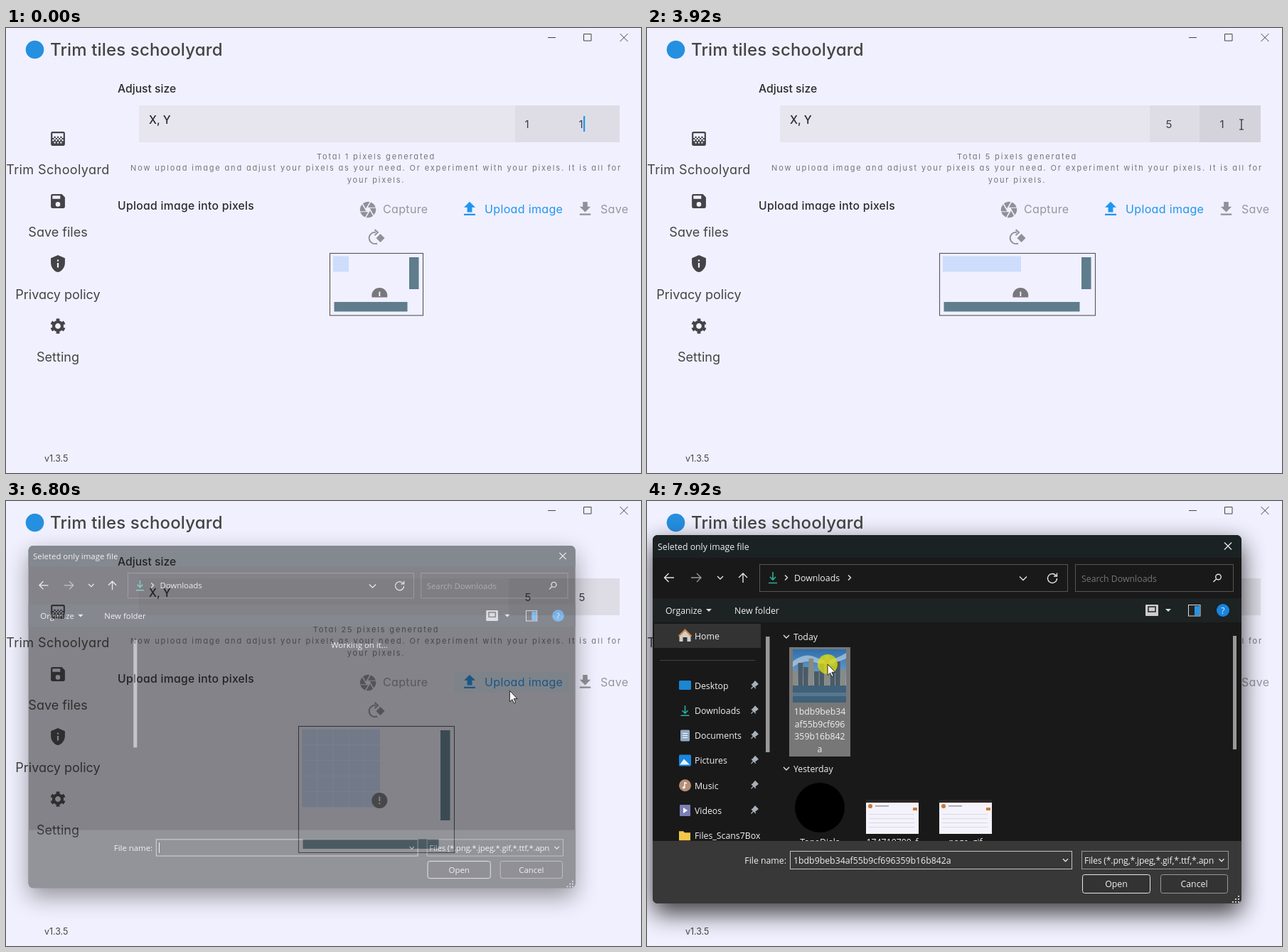
Write an HTML page that moves like this. It is 893 px wide and 627 px high and loops after 8 s.

```html
<!DOCTYPE html>
<html lang="en">
<head>
<meta charset="utf-8">
<title>Pixel grid app</title>
<style>
html, body { margin: 0; width: 100%; height: 100%; overflow: hidden; background: #f1f0fe; }
svg { display: block; width: 893px; height: 627px; }
text { white-space: pre; }
#app text { font-family: Inter, sans-serif; font-feature-settings: "cv11"; fill: #444; }
#app .head { font-size: 15.7px; font-weight: 500; fill: #2a2a2d; }
#app .nav { font-size: 18px; text-anchor: middle; }
#app .hint { font-size: 11px; letter-spacing: 1.84px; text-anchor: middle; fill: #75757c; }
#app .btn { font-size: 16px; letter-spacing: .35px; fill: #96969e; }
#app .num { font-size: 15px; fill: #3c3c40; }
#dialog text { font: 12.3px "Open Sans", "Noto Sans", sans-serif; fill: #f0f0f0; }
.line { fill: none; stroke: #e4e4e4; stroke-width: 1.4; }
.mid { text-anchor: middle; }
#shade { filter: blur(17px); }
</style>
</head>
<body>
<svg viewBox="0 0 893 627">
  <defs>
    <clipPath id="boxClip"><rect id="boxClipRect" x="411" y="317" width="220"/></clipPath>
    <clipPath id="listClip"><rect x="8" y="171" width="828" height="308"/></clipPath>
    <clipPath id="typeClip"><rect x="612" y="493" width="185" height="26"/></clipPath>
    <linearGradient id="sky" x2="0" y2="1">
      <stop stop-color="#2d6fae"/><stop offset="1" stop-color="#b9cfdd"/>
    </linearGradient>
  </defs>
  <g id="app"></g>
  <g id="dialog"></g>
  <g id="pointer">
    <circle id="click" r="14" fill="#dcdc10" opacity=".78"/>
    <path id="arrow" d="M0 0V15.5L3.6 12.2 6 17.6 8.3 16.6 5.9 11.3H10.8Z" fill="#fff" stroke="#222"/>
    <path id="beam" d="M-3-7H-1Q0-7 0-6 0-7 1-7H3M0-6V6M-3 7H-1Q0 7 0 6 0 7 1 7H3" fill="none" stroke="#222" stroke-width="1.2"/>
    <path id="hand" d="M0 2A1.8 1.8 0 0 1 3.6 2V8L8.2 9.2A2.5 2.5 0 0 1 10 12L9 17.5 8 21H.5L-4.5 14A1.5 1.5 0 0 1-2.5 11.8L0 13.6Z" fill="#fff" stroke="#222" stroke-width="1.2"/>
  </g>
</svg>
<script>
const $ = id => document.getElementById(id);
const rect = (x, y, w, h, fill, more = '') =>
  `<rect x="${x}" y="${y}" width="${w}" height="${h}" fill="${fill}" ${more}/>`;
const text = (x, y, s, more = '') => `<text x="${x}" y="${y}" ${more}>${s}</text>`;
const path = (d, more = 'class="line"') => `<path d="${d}" ${more}/>`;
const icon = (x, y, k, d, fill) =>
  `<path transform="translate(${x} ${y}) scale(${k}) translate(-12 -12)" d="${d}" fill="${fill}"/>`;
const range = n => [...Array(n).keys()];
const chevDown = (x, y, k = 4) => path(`M${x - k} ${y - k / 2}l${k} ${k}l${k} ${-k}`);
const chevRight = (x, y) => path(`M${x - 2} ${y - 3.5}l3.5 3.5l-3.5 3.5`);
const triangle = (x, y) => path(`M${x - 4} ${y - 2}h8l-4 4z`, 'fill="#ddd"');

function gear(x, y) {
  return `<g transform="translate(${x} ${y})" fill="none" stroke="#444448">
    <circle r="6" stroke-width="4.2"/>
    <circle r="9" stroke-width="3.4" pathLength="12" stroke-dasharray="1 1" stroke-dashoffset="1.5"/></g>`;
}

function drawApp() {
  const dark = '#444448', gray = '#909098', blue = '#1e96f0';
  const navs = ['Trim Schoolyard', 'Save files', 'Privacy policy', 'Setting'];
  $('app').innerHTML =
    rect(0, 0, 893, 627, '#f1f0fe') +
    '<circle cx="40.5" cy="30.5" r="12.8" fill="#2590e0"/>' +
    text(62, 39, 'Trim tiles schoolyard', 'font-size="24" font-weight="500" letter-spacing=".15"') +
    path('M762 13.5H773M812.5 8.5H823V18H812.5ZM863.5 8L874.5 19M874.5 8L863.5 19',
      'fill="none" stroke="#444"') +
    icon(73, 156, 1.1, 'M11 9h2v2h-2zm-2 2h2v2H9zm4 0h2v2h-2zm2-2h2v2h-2zM7 9h2v2H7zm12-6H5c-1.1 0-2 .9-2 2v14c0 1.1.9 2 2 2h14c1.1 0 2-.9 2-2V5c0-1.1-.9-2-2-2zM9 18H7v-2h2zm4 0h-2v-2h2zm4 0h-2v-2h2zm2-7h-2v2h2v2h-2v-2h-2v2h-2v-2h-2v2H9v-2H7v2H5v-2h2v-2H5V5h14z', dark) +
    icon(73, 244, 1.1, 'M17 3H5c-1.1 0-2 .9-2 2v14c0 1.1.9 2 2 2h14c1.1 0 2-.9 2-2V7l-4-4zm-5 16a3 3 0 1 1 0-6 3 3 0 0 1 0 6zm3-10H5V5h10v4z', dark) +
    icon(73, 332, 1.1, 'M12 1L3 5v6c0 5.55 3.84 10.74 9 12 5.16-1.26 9-6.45 9-12V5zm-1 6h2v2h-2zm0 4h2v6h-2z', dark) +
    gear(73, 420) +
    navs.map((s, i) => text(73, 206 + i * 88, s, 'class="nav"' + (i ? '' : ' letter-spacing=".4"'))).join('') +
    text(54, 611, 'v1.3.5', 'font-size="12.4" fill="#555"') +
    text(157, 91, 'Adjust size', 'class="head"') +
    rect(187, 109, 676, 52, '#e7e6ef') +
    '<rect id="cells" y="109" height="52" fill="#dedde6"/>' +
    rect(777, 109, 86, 52, '#d4d3dc', 'id="cellY"') +
    text(201, 135, 'X, Y', 'class="head"') +
    text(729.5, 141, '', 'class="num" id="numX"') + text(805.5, 141, '', 'class="num" id="numY"') +
    rect(0, 124, 2.2, 22, blue, 'id="caret"') +
    text(520.5, 185, '', 'class="hint" id="total"') +
    text(520.5, 201, 'Now upload image and adjust your pixels as your need. Or experiment with your pixels. It is all for', 'class="hint"') +
    text(520.5, 217.5, 'your pixels.', 'class="hint"') +
    text(157, 255.5, 'Upload image into pixels', 'class="head" letter-spacing=".3"') +
    icon(509, 256, 1.12, 'M9.4 10.5l4.77-8.26A10 10 0 0 0 5.68 4.25l3.66 6.35zM21.54 9a10 10 0 0 0-6-6.34L11.88 9zm.26 1h-7.49l5.05 8.75A10 10 0 0 0 21.8 10zM8.54 12l-3.9-6.75A10 10 0 0 0 2.2 14h7.49zm-6.08 3a10 10 0 0 0 6 6.34L12.12 15zm11.27 0l-3.9 6.76a10 10 0 0 0 8.49-2.01l-3.66-6.35z', gray) +
    text(530, 261, 'Capture', 'class="btn"') +
    rect(630, 240, 163, 30, '#e5effd', 'id="hover" rx="4"') +
    icon(652, 255, 1.14, 'M5 20h14v-2H5zm0-10h4v6h6v-6h4l-7-7z', blue) +
    text(673, 261, 'Upload image', `class="btn" style="fill:${blue}"`) +
    icon(814.5, 255, 1.1, 'M19 9h-4V3H9v6H5l7 7zM5 18v2h14v-2z', gray) +
    text(836, 261, 'Save', 'class="btn"') +
    path('M522 303.5A8.2 8.2 0 1 1 520 287.8M518.5 284l4.5 4-4.5 4', `fill="none" stroke="${gray}" stroke-width="1.9"`) +
    path('M526.5 290l6 6-6 6-6-6z', `fill="${gray}"`) +
    '<g id="grid"></g>';
}

function drawGrid(cols, rows) {
  const wide = cols > 1, tall = rows > 1;
  const x = wide ? 411.5 : 455.5, w = wide ? 219 : 131, h = tall ? 178 : 87.5;
  const cx = x + 4.5, cy = tall ? 422 : 377, bar = '#5f7d8c';
  let lines = '';
  if (tall) for (let i = 1; i < 5; i++)
    lines += `M${cx} ${321.5 + i * 22}h110M${cx + i * 22} 321.5v110`;
  $('boxClipRect').setAttribute('height', h - 25);
  $('grid').innerHTML =
    rect(x, 317.5, w, h, 'none', 'stroke="#55555a" stroke-width="1.1"') +
    rect(cx, 321.5, cols * 22, rows * 22, '#cdddfb') +
    path(lines, 'stroke="#dce7fd"') +
    rect(x + w - 19.5, 323, 13.5, tall ? 127 : 45, bar) +
    rect(x + 6, 298.5 + h, w - 28, 13.5, bar) +
    `<g clip-path="url(#boxClip)"><circle cx="525.3" cy="${cy}" r="11" fill="#77777d"/>` +
    rect(524.3, cy - 5.5, 2, 6.5, '#eee') + rect(524.3, cy + 3, 2, 2.2, '#eee') + '</g>';
}

function sidebar() {
  const names = ['Desktop', 'Downloads', 'Documents', 'Pictures', 'Music', 'Videos', 'Files_Scans7Box'];
  const glyphs = [
    y => rect(45, y - 7, 17, 13, '#1b86d2', 'rx="1.5"'),
    y => path(`M53.5 ${y - 7}v11m-4-4l4 4 4-4M47.5 ${y + 7}h12`, 'fill="none" stroke="#2bb09c" stroke-width="1.6"'),
    y => rect(47, y - 8, 13, 16, '#8fa9c4', 'rx="1.5"') + path(`M50 ${y - 3}h7m-7 3h7m-7 3h7`, 'stroke="#fff"'),
    y => rect(45, y - 8, 17, 16, '#1b86dc', 'rx="1.5"') + path(`M46 ${y + 6}l6-8 8 8z`, 'fill="#e8f4ff"'),
    y => `<circle cx="53.5" cy="${y}" r="8.5" fill="#b58e76"/>` + path(`M53 ${y + 3}v-7l3 1`, 'fill="none" stroke="#fff" stroke-width="1.4"') + `<circle cx="51.7" cy="${y + 3}" r="1.8" fill="#fff"/>`,
    y => rect(46, y - 8, 15, 16, '#7a7fb4', 'rx="1"') + path(`M51 ${y - 4}l6 4-6 4z`, 'fill="#fff"'),
    y => path(`M45 ${y - 6}h6l2 2h8v11h-16z`, 'fill="#f3c64a"')
  ];
  return rect(10, 173, 150, 34, '#333') +
    path('M45.5 190l8-8 8 8v8h-5v-6h-6v6h-5z', 'fill="#d3cdc6"') +
    path('M44.5 190.5l9-9 9 9', 'fill="none" stroke="#d08244" stroke-width="2"') +
    text(67, 194.5, 'Home') + rect(18, 224, 134, 1, '#444') +
    names.map((s, i) => {
      const y = 260 + i * 35.2;
      const pin = path(`M148 ${y - 1}l4-5 4 4-5 4zM147 ${y - 2}l6 6M149.5 ${y + 1}l-3 3.5`, 'fill="#a9b0b8" stroke="#a9b0b8" stroke-width="1.3"');
      return glyphs[i](y) + text(67, y + 4.7, s) + (i < 6 ? pin : '');
    }).join('');
}

function photo() {
  const tops = [239, 228, 234, 222, 240, 229, 218, 232, 226, 238];
  return rect(205, 209, 75, 75, 'url(#sky)') +
    path('M205 226q18-14 34-5t41-7v8q-26 12-42 6t-33 6z', 'fill="#c8dbe8" opacity=".6"') +
    tops.map((y, i) => rect(205 + i * 7.5, y, 6.7, 263 - y, i % 3 ? '#4d5a63' : '#8a8a80')).join('') +
    rect(205, 260, 75, 24, '#3f6179') + rect(205, 270, 75, 5, '#57788c');
}

const shot = x => rect(x, 421, 74, 48, '#f4f2fa') + rect(x, 421, 74, 4, '#2c2626') +
  `<circle cx="${x + 6}" cy="430" r="3" fill="#c9793c"/>` + rect(x + 13, 429, 19, 1.5, '#999') +
  rect(x + 66, 432, 6, 4, '#c9793c') +
  range(4).map(i => rect(x + 4, 441 + i * 6, 64, .8, '#d4d2da')).join('');

function files() {
  const hash = ['1bdb9beb34', 'af55b9cf696', '359b16b842', 'a'];
  return chevDown(196, 191) + text(206, 195.5, 'Today') +
    rect(200, 206, 86, 154, '#777', 'id="pick"') + photo() +
    hash.map((s, i) => text(243, 301 + i * 17.7, s, 'class="mid"')).join('') +
    chevDown(196, 377) + text(206, 381.5, 'Yesterday') +
    '<circle cx="243" cy="432" r="35" fill="#000"/>' + shot(308) + shot(411) +
    text(243, 485, 'ToneDials', 'class="mid"') + text(345, 485, '174710700_f', 'class="mid"') +
    text(448, 485, 'page_gif', 'class="mid"') + rect(824, 190, 5, 160, '#999');
}

function drawDialog() {
  const field = (x, y, w, h, c) => rect(x, y, w, h, 'none', `stroke="${c}"`);
  $('dialog').innerHTML =
    rect(8, 60, 828, 521, '#000', 'id="shade" rx="8" opacity=".75"') +
    rect(8, 48, 828, 519, '#191919', 'rx="7"') +
    path('M8 80V55a7 7 0 0 1 7-7H829a7 7 0 0 1 7 7V80z', 'fill="#1a2223"') +
    rect(8, 137, 828, 34, '#1d2223') +
    path('M8 479H836V560a7 7 0 0 1-7 7H15a7 7 0 0 1-7-7z', 'fill="#383838"') +
    text(15, 68.5, 'Seleted only image file') +
    path('M812 58.5l10 10m0-10l-10 10M38 108H24.5m6-6l-6 6 6 6M135 115V102m-6 6l6-6 6 6') +
    path('M62 108H76m-6-6l6 6-6 6', 'fill="none" stroke="#999" stroke-width="1.4"') +
    chevDown(103, 108) + field(158.5, 89.5, 433, 38, '#555') +
    path('M177 100v11m-4-4l4 4 4-4M171 115.5h12', 'fill="none" stroke="#2bb09c" stroke-width="1.6"') +
    chevRight(196, 108) + text(207, 112.5, 'Downloads') + `<g id="chev2">${chevRight(285, 108)}</g>` +
    chevDown(529, 109, 5) + path('M575.5 105.5A6.5 6.5 0 1 0 576.5 109M576.5 101.5v4.5h-4.5') +
    field(602.5, 89.5, 222, 38, '#555') + text(611, 113.5, 'Search Downloads', 'style="fill:#747474"') +
    '<circle cx="803.5" cy="107" r="3.8" class="line"/>' + path('M800.5 110l-4 4') +
    text(26, 159, 'Organize') + triangle(87, 154) + text(123, 159, 'New folder') +
    rect(701, 146, 18, 16, '#ccc', 'rx="1"') + rect(705, 149, 10, 7, '#ccc', 'stroke="#222" stroke-width="1.5"') +
    triangle(733, 154) + rect(761.5, 146.5, 16.5, 15.5, '#222', 'stroke="#ddd"') + rect(770, 148, 7, 13, '#2494e8') +
    '<circle cx="810" cy="154" r="9" fill="#1685e0"/>' + text(810, 158.5, '?', 'class="mid"') +
    `<g clip-path="url(#listClip)"><g id="side">${sidebar()}</g><g id="files">${files()}</g></g>` +
    rect(167, 191, 5.5, 163, '#999') +
    text(466, 203, 'Working on it...', 'id="wait"') +
    text(196, 511, 'File name:', 'text-anchor="end"') + field(201.5, 493.5, 396, 25, '#c4c4c4') +
    text(206, 511, '', 'id="fname"') + rect(205.5, 498, 1, 16, '#fff', 'id="fcaret"') + chevDown(588.5, 506, 3.5) +
    field(611.5, 493.5, 206, 25, '#999') +
    `<g clip-path="url(#typeClip)">${text(615, 511, 'Files (*.png,*.jpeg,*.gif,*.ttf,*.apng)', 'letter-spacing="-.2"')}</g>` + chevDown(808, 506, 3.5) +
    rect(612.5, 526.5, 95, 26, '#333', 'rx="3" stroke="#e8e8e8"') + text(660, 544, 'Open', 'class="mid"') +
    rect(722.5, 526.5, 94, 26, '#333', 'rx="3" stroke="#999"') + text(769.5, 544, 'Cancel', 'class="mid"') +
    range(9).map(i => {
      const r = Math.floor(i / 3), c = i % 3;
      return r + c < 2 ? '' : rect(823 + c * 4, 556 + r * 4, 2, 2, '#ccc');
    }).join('');
}

// Piecewise linear lookup: keys are [time, ...values].
function track(keys, t) {
  if (t <= keys[0][0]) return keys[0].slice(1);
  for (let i = 1; i < keys.length; i++) {
    const a = keys[i - 1], b = keys[i];
    if (t < b[0]) {
      const k = (t - a[0]) / (b[0] - a[0]);
      return a.slice(1).map((v, j) => v + (b[j + 1] - v) * k);
    }
  }
  return keys[keys.length - 1].slice(1);
}

const MOVES = [[400, 831, 570], [520, 776, 398], [680, 776, 398], [920, 762, 125], [1080, 762, 125],
  [1200, 749, 133], [2760, 749, 133], [3040, 812, 137], [3600, 812, 137], [3720, 836, 136],
  [4840, 836, 136], [5200, 713, 268], [6720, 713, 268], [6840, 706, 267], [7200, 706, 267], [7520, 254, 230]];
const CARETS = [[0, 400, 812], [880, 1400, 812], [1400, 1800, 735], [1800, 2320, 729.7], [2320, 2880, 740],
  [3400, 3920, 740], [4000, 4400, 812], [4400, 4640, 807], [4640, 5160, 817], [5640, 6120, 817]];
const CLICKS = [[1440, 1600], [3960, 4120], [6160, 6440], [7840, 8000]];
const ZOOM = [[6760, .9], [6840, .9577], [6880, .9577], [6920, .988], [6960, 1]];
const FADE = [[6760, 0], [6840, 1]];
const during = (list, t) => list.find(s => t >= s[0] && t < s[1]);
const show = (id, on) => $(id).style.display = on ? '' : 'none';

let gridKey = '';
function render(t) {
  const cols = t < 2320 ? 1 : 5, rows = t < 4640 ? 1 : 5;
  const [px, py] = track(MOVES, t);
  const modal = t >= 6800, overField = py > 109 && py < 161 && px > 707;

  if (gridKey !== cols + 'x' + rows) {
    gridKey = cols + 'x' + rows;
    drawGrid(cols, rows);
    $('total').textContent = `Total ${cols * rows} pixels generated`;
  }
  $('numX').textContent = t >= 1800 && t < 2320 ? '' : cols;
  $('numY').textContent = t >= 4400 && t < 4640 ? '' : rows;
  const left = t < 880 ? 716 : 707;
  $('cells').setAttribute('x', left);
  $('cells').setAttribute('width', 863 - left);
  show('cellY', overField && px > 777 && !modal);
  const caret = during(CARETS, t);
  show('caret', caret);
  if (caret) $('caret').setAttribute('x', caret[2]);
  show('hover', py > 240 && py < 270 && px > 630 && px < 793 && t > 5000);
  $('hover').setAttribute('fill', t >= 6160 && t < 6520 ? '#d9e9fc' : '#e5effd');

  show('dialog', modal);
  const k = track(ZOOM, t)[0];
  $('dialog').setAttribute('transform', `translate(${339 * (1 - k)} ${260 * (1 - k)}) scale(${k})`);
  $('dialog').setAttribute('opacity', track(FADE, t)[0]);
  const loaded = t >= 7240, picked = t >= 7840;
  show('side', t >= 7040);
  show('files', loaded);
  show('chev2', loaded);
  show('wait', !loaded);
  show('pick', t >= 7480);
  $('pick').setAttribute('fill', picked ? '#777' : '#4d4d4d');
  $('fname').textContent = picked ? '1bdb9beb34af55b9cf696359b16b842a' : '';
  show('fcaret', !picked);

  show('pointer', t >= 400);
  $('pointer').setAttribute('transform', `translate(${px} ${py})`);
  const hand = t >= 5160 && t < 6720, beam = overField && !modal;
  show('hand', hand);
  show('beam', beam);
  show('arrow', !hand && !beam);
  show('click', during(CLICKS, t));
}

drawApp();
drawDialog();
const start = performance.now();
function tick() {
  const t = (performance.now() - start) % 8000;
  render(Math.floor(t / 40) * 40);
  requestAnimationFrame(tick);
}
tick();
</script>
</body>
</html>
```
